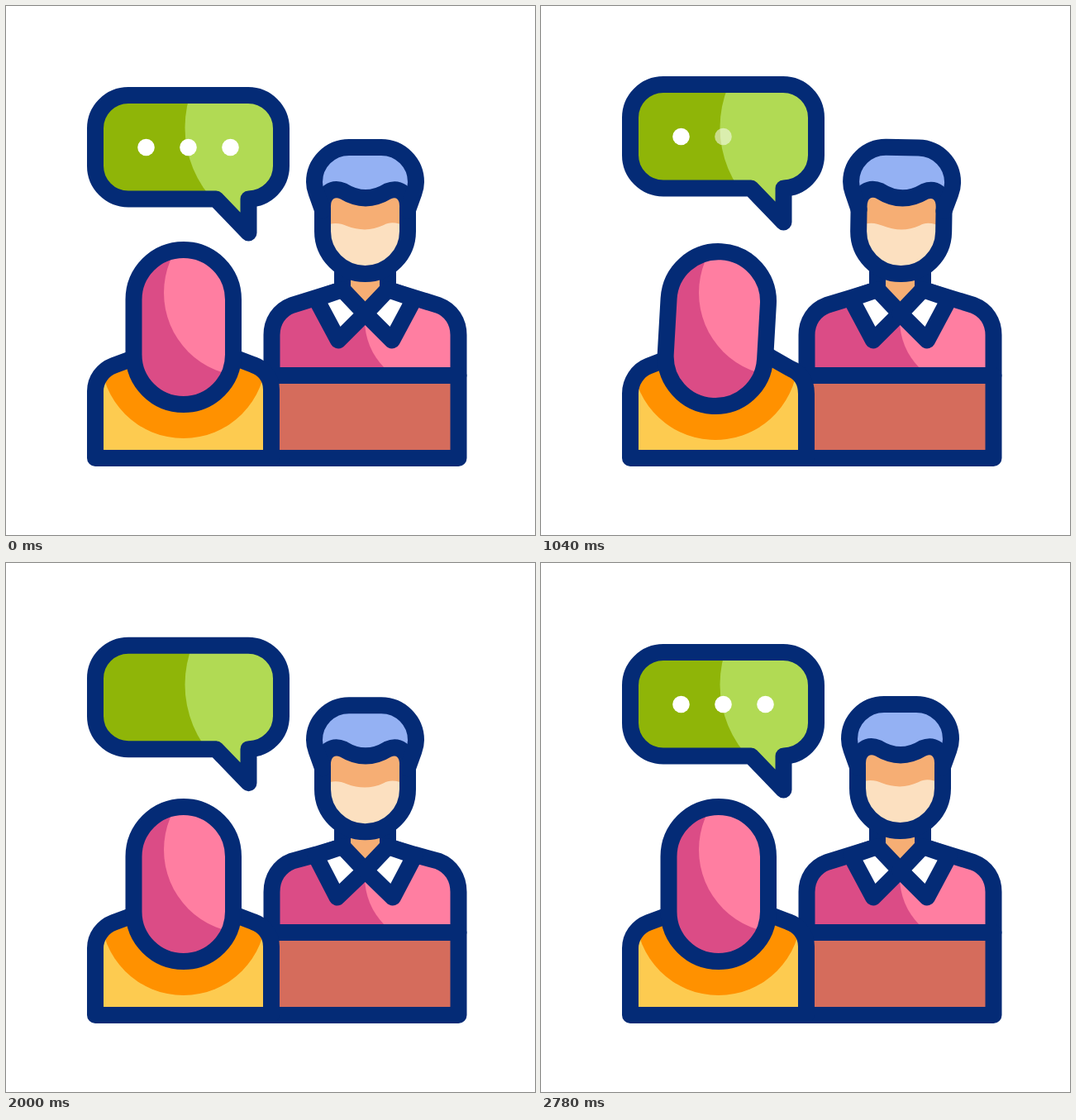
An HTML page for the animation above (2900 ms loop, 640 by 640 pixels).

```html
<!DOCTYPE html>
<html lang="en">
<head>
<meta charset="utf-8">
<title>Conversation at the desk</title>
<style>
  html, body { margin: 0; width: 100%; height: 100%; overflow: hidden; background: #fff; }
  svg { display: block; width: 100%; height: 100%; }
  .line { fill: none; stroke: #042b76; stroke-width: 20; stroke-linejoin: round; stroke-linecap: round; }
</style>
</head>
<body>
<svg viewBox="0 0 640 640">
  <defs>
    <path id="bubble" d="M148 108H293A40 40 0 0 1 333 148V193.5A40 40 0 0 1 293.5 233.5V274.5L254 233.5H148A40 40 0 0 1 108 193.5V148A40 40 0 0 1 148 108Z"/>
    <rect id="hood" x="154.5" y="295" width="120.5" height="187" rx="60.25"/>
    <path id="body"/>
    <path id="jacket"/>
    <path id="face" d="M383 245C382 225 396 219 408 224C426 235 444 235 462 224C474 219 487 225 486 245V272.5A51.5 51.5 0 0 1 383 272.5Z"/>
    <path id="hair" d="M383 247L375.5 226C374 222 373 217 373 213A42 42 0 0 1 415 171H454A42 42 0 0 1 496 213C496 217 495 222 493.5 226L486 247"/>
    <clipPath id="bubbleClip"><use id="bubbleMask" href="#bubble"/></clipPath>
    <clipPath id="hoodClip"><use id="hoodMask" href="#hood"/></clipPath>
    <clipPath id="bodyClip"><use href="#body"/></clipPath>
    <clipPath id="jacketClip"><use href="#jacket"/></clipPath>
    <clipPath id="faceClip"><use href="#face"/></clipPath>
  </defs>

  <!-- Clerk -->
  <g clip-path="url(#jacketClip)">
    <path fill="#db4c86" d="M310 330H560V450H310Z"/>
    <circle cx="516" cy="380" r="82" fill="#ff7ea1"/>
  </g>
  <use href="#jacket" class="line"/>
  <path fill="#f6ae74" d="M407 315H462V343L434.5 371L407 343Z"/>
  <path class="line" d="M407 320V343M462 320V343"/>
  <path id="collarLeft" class="line" style="fill:#fff"/>
  <path id="collarRight" class="line" style="fill:#fff"/>
  <g id="head">
    <use href="#hair" fill="#94b1f3"/>
    <g clip-path="url(#faceClip)">
      <path fill="#fce0c0" d="M380 215H490V330H380Z"/>
      <path fill="#f6ae74" d="M383 267C396 261 404 263 412 266C428 272 442 272 457 265C464 261 472 261 486 267V215H383Z"/>
    </g>
    <use href="#face" class="line"/>
    <use href="#hair" class="line"/>
  </g>

  <!-- Desk -->
  <path fill="#d56c5c" d="M321 447H547.5V547H321Z"/>
  <path class="line" d="M321.5 447H547.5V547H321.5"/>

  <!-- Visitor -->
  <g clip-path="url(#bodyClip)">
    <path fill="#fdcb50" d="M98 400H331V547H98Z"/>
    <circle id="scarf" cx="214.7" cy="423" r="100" fill="#ff9100"/>
  </g>
  <use href="#body" class="line"/>
  <g clip-path="url(#hoodClip)">
    <path fill="#db4c86" d="M120 280H300V500H120Z"/>
    <circle cx="292" cy="347" r="101" fill="#ff7ea1"/>
  </g>
  <use id="hoodLine" href="#hood" class="line"/>

  <!-- Speech bubble: the shade stays put while the outline floats -->
  <g clip-path="url(#bubbleClip)">
    <path fill="#8fb508" d="M98 60H343V290H98Z"/>
    <circle cx="346.5" cy="147" r="130" fill="#b1da54"/>
  </g>
  <g id="bubbleFront">
    <use href="#bubble" class="line"/>
    <g id="dots" fill="#fff">
      <circle cx="169.5" cy="171" r="10.3"/>
      <circle cx="220.5" cy="171" r="10.3"/>
      <circle cx="271.5" cy="171" r="10.3"/>
    </g>
  </g>
</svg>
<script>
const LOOP = 2900, MOTION = 2780, DOT_CYCLE = 1390;
const $ = id => document.getElementById(id);
const set = (id, name, value) => $(id).setAttribute(name, value);
const clamp = x => Math.min(1, Math.max(0, x));
const smooth = x => x * x * (3 - 2 * x);

const LEAN = [[0, 0], [620, 5], [1200, 2.9], [1620, 5.8], [2000, 0]];
const TILT = [[0, 0], [560, 2.2], [840, 2.2], [1200, 0]];
const NOD = [[1020, 0], [1300, 5.1], [1910, 0.8], [2280, 3.4], [2780, 0]];

function track(keys, t) {
  if (t <= keys[0][0]) return keys[0][1];
  for (let i = 1; i < keys.length; i++) {
    const [t0, a] = keys[i - 1], [t1, b] = keys[i];
    if (t < t1) return a + (b - a) * smooth((t - t0) / (t1 - t0));
  }
  return keys[keys.length - 1][1];
}

// Cubic Bezier (0.42, 0, 1, 1), solved by bisection
function easeIn(x) {
  let low = 0, high = 1;
  for (let i = 0; i < 24; i++) {
    const s = (low + high) / 2, r = 1 - s;
    if (1.26 * r * r * s + 3 * r * s * s + s ** 3 < x) low = s; else high = s;
  }
  return low * low * (3 - 2 * low);
}

function drawBubble(t) {
  const y = -21.2 * easeIn(clamp(1 - Math.abs(t - 1400) / 1400));
  for (const id of ["bubbleMask", "bubbleFront"]) set(id, "transform", `translate(0 ${y})`);
  const local = t % DOT_CYCLE;
  [...$("dots").children].forEach((dot, i) => {
    const out = clamp((local - 10 - 200 * i) / 200);
    const back = clamp((local - 735 - 200 * i) / 200);
    dot.setAttribute("opacity", 1 - out + back);
  });
}

function drawVisitor(t) {
  const angle = track(LEAN, t), k = angle / 5;
  const pose = `translate(0 ${angle * 0.65}) rotate(${angle} 214.7 355)`;
  for (const id of ["hoodMask", "hoodLine", "scarf"]) set(id, "transform", pose);
  set("body", "d", `M108 547V${466 + 4 * k}C108 ${452 + 4 * k} 117 ${440 + k} 130 ${435 + k}L165 422
    L265 ${421 - 5 * k}L${299 + 4 * k} ${434 + 7 * k}C313 ${439 + 6 * k} 321 ${450 + 6 * k} 321 ${464 + 8 * k}V547Z`);
}

function drawClerk(t) {
  const nod = track(NOD, t), d = nod / 5;
  set("head", "transform", `translate(0 ${nod}) rotate(${track(TILT, t)} 434.5 345)`);
  set("jacket", "d", `M321.5 447V398C321.5 ${382 - 2 * d} 330 ${368 - 5 * d} 346 ${362 - 6 * d}L375 ${353 - d}L407 343
    H462L494 ${353 - d}L523 ${362 - 6 * d}C539 ${368 - 5 * d} 547.5 ${382 - 2 * d} 547.5 398V447Z`);
  set("collarLeft", "d", `M407 343L${375 - 2 * d} 354L${402 - 6 * d} 404.5L434.5 372Z`);
  set("collarRight", "d", `M462 343L${494 + 2 * d} 354L${467 + 4 * d} 404.5L434.5 372Z`);
}

function render(time) {
  const t = Math.min(time % LOOP, MOTION);
  drawBubble(t);
  drawVisitor(t);
  drawClerk(t);
}

const start = performance.now();
function tick() {
  render(performance.now() - start);
  requestAnimationFrame(tick);
}
tick();
</script>
</body>
</html>
```
